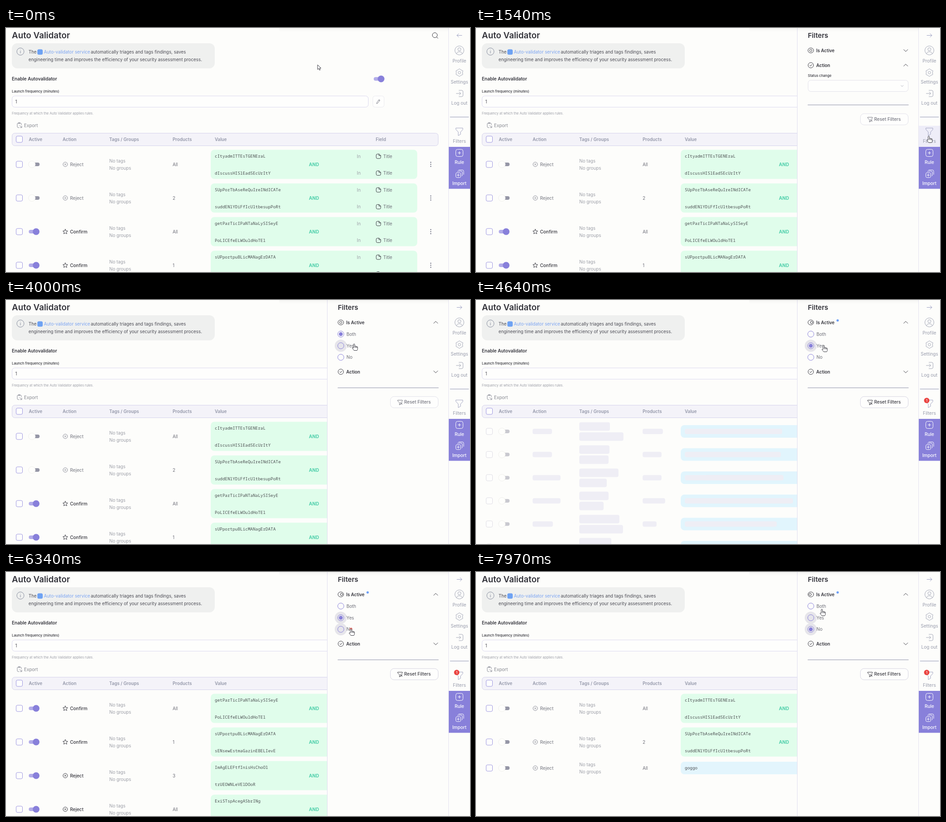
An HTML page for the animation above (8 s loop, 1029 by 544 pixels).

```html
<!DOCTYPE html>
<html lang="en">
<head>
<meta charset="utf-8">
<title>Auto Validator</title>
<style>
  html, body { margin: 0; width: 100%; height: 100%; overflow: hidden; background: #fdfdfb; }
  svg { display: block; width: 100%; height: 100%; }
  text { font: 400 9.8px Inter, "Open Sans", sans-serif; fill: #4c4c55; white-space: pre; }
  .semi { font-weight: 600; fill: #33333b; }
  .med { font-weight: 500; fill: #33333b; }
  .dim { fill: #85878f; }
  .soft { fill: #9c9ea7; }
  .option { fill: #6c6d77; }
  .link { fill: #7ba4f2; }
  .reset { font-weight: 500; fill: currentColor; }
  .head { font-weight: 600; fill: #9397a9; }
  .mono { font: 400 9.4px "Noto Sans Mono", "DejaVu Sans Mono", monospace; fill: #4c4f52; }
  .and { font-weight: 700; fill: #4fcfab; text-anchor: middle; }
  .side { fill: #979bab; text-anchor: middle; }
  .light { font-weight: 500; fill: #fff; text-anchor: middle; }
  .icon { fill: none; stroke-width: 1; stroke-linecap: round; stroke-linejoin: round; }
</style>
</head>
<body>
<svg id="stage" viewBox="0 0 1029 544" preserveAspectRatio="none"></svg>
<script>
const LOOP = 8000;
const PAGE = '#fdfdfb', PURPLE = '#8880da', DARK = '#3a3a42', GREY = '#a3a7b6';

// Markup helpers; text is placed by its vertical centre.
const text = (x, y, str, cls = '', size = 9.8) =>
  `<text x="${x}" y="${y + size * .36}" class="${cls}" style="font-size:${size}px">${str}</text>`;
const mono = (x, y, str) => text(x, y, str, 'mono', 9.4);
const rect = (x, y, w, h, r, fill, stroke = 'none') =>
  `<rect x="${x}" y="${y}" width="${w}" height="${h}" rx="${r}" fill="${fill}" stroke="${stroke}"/>`;
const circle = (x, y, r, fill, stroke = 'none') =>
  `<circle cx="${x}" cy="${y}" r="${r}" fill="${fill}" stroke="${stroke}"/>`;
const path = (d, stroke = DARK, x = 0, y = 0) =>
  `<path class="icon" d="${d}" stroke="${stroke}" transform="translate(${x} ${y})"/>`;
const group = (id, body) => `<g id="${id}">${body}</g>`;

const FUNNEL = 'M-7.5-8h15v3.5l-5 5.5v5l-5 3v-8l-5-5.5z';
const STAR = 'M0-5.5 1.6-1.8 5.5-1.5 2.5 1.1 3.5 5 0 2.9-3.5 5-2.5 1.1-5.5-1.5-1.6-1.8Z';
const CROSS = 'M-1.8-1.8 1.8 1.8M1.8-1.8-1.8 1.8';
const DOC = 'M-5-2.5q0-2.5 2.5-2.5h4l3.5 3.5v4q0 2.5-2.5 2.5h-5q-2.5 0-2.5-2.5zM1-5v3.5h4';
const PLUS = 'M-3 0h6M0-3v6';
const CHEVRON = 'M-4.5-2 0 2.5 4.5-2';

const checkbox = (y, color = '#9b95e0') => rect(22.5, y - 7, 14, 14, 3, '#fefefd', color);

function toggle(x, y, on, track = '#9596a6') {
  return on
    ? rect(x, y - 4, 18, 8, 4, '#b2ace9') + circle(x + 16.3, y, 7.5, PURPLE)
    : rect(x + 6, y - 4, 18, 8, 4, track) + circle(x + 7, y, 7.5, '#fefefc', '#f0f0ec');
}

const RULES = {
  city: [['cItyadmITTEsTGENEraL', 'dIscussHISlEadSEcUrItY'], 'All', 'Reject', false],
  base: [['SUpPorTbAseReQuIreINdICATe', 'suddENlYDiFfIcUltbesupPoRt'], '2', 'Reject', false],
  part: [['getParTicIPaNTaNaLySISeyE', 'PoLICEfeELWOuldHoTEl'], 'All', 'Confirm', true],
  data: [['sUPportpuBLicMANagErDATA', 'sENsewEstmaGazinEBELIevE'], '1', 'Confirm', true],
  left: [['ImAgELEFtfInisHsChoOl', 'trUEOWNLeVElDOoR'], '3', 'Reject', true],
  gas: [['ExiSTspAcegASbrINg', 'sOmETiMEcArRyHoLd'], 'All', 'Reject', true],
  short: [['goggo'], 'All', 'Reject', false],
};

function ruleRow([values, products, action, on], y) {
  const pair = values.length > 1;
  const color = on ? DARK : '#8b8d98';
  let out = checkbox(y) + toggle(50.5, y, on);
  out += action === 'Confirm'
    ? path(STAR, color, 131.5, y)
    : circle(131.5, y, 5, 'none', color) + path(CROSS, color, 131.5, y);
  out += text(142, y, action, on ? 'med' : 'med dim', 10);
  out += text(229, y - 8, 'No tags', 'soft') + text(229, y + 8, 'No groups', 'soft');
  out += text(369.5, y, products, 'option');
  out += pair ? rect(454, y - 32.5, 458, 65, 8, '#e0fdeb') : rect(454, y - 14, 458, 28, 8, '#e3f5fd');
  values.forEach((value, i) => {
    const vy = pair ? y - 18 + i * 37.5 : y;
    out += mono(463, vy, value) + text(778, vy, 'In', 'soft');
    out += path(DOC, DARK, 826, vy) + text(836.5, vy, 'Title', 'option');
  });
  if (pair) out += text(683, y, 'AND', 'and', 10);
  return out + [-4.5, 0, 4.5].map(d => circle(942, y + d, 1.2, '#77798a')).join('');
}

function ruleList(names) {
  let y = 304;
  return names.split(' ').map((name, i) => {
    if (i) y += name === 'short' ? 58 : 75;
    return ruleRow(RULES[name], y);
  }).join('');
}

// Each entry: widths of action, two tag bars, products, value.
const LOADING_YES = [[43, 68, 98, 45, 216], [43, 67, 65, 42, 213], [62, 87, 61, 42, 219],
  [62, 65, 54, 50, 240], [45, 89, 97, 31, 204], [50, 71, 60, 40, 210]];
const LOADING_NO = [[57, 65, 56, 37, 201], [40, 69, 84, 40, 199], [54, 68, 65, 47, 201],
  [47, 91, 90, 28, 171], [71, 81, 71, 43, 192], [50, 71, 60, 40, 200]];

function skeleton(rows) {
  return rows.map(([action, tagA, tagB, products, value], i) => {
    const y = 293 + i * 51.6;
    const bar = (x, by, w, h) => rect(x, by - h / 2, w, h, 4, '#efeef5');
    return checkbox(y, '#dddce4') + toggle(50.5, y, false, '#c9c9d0') +
      rect(454, y - 14, 458, 28, 8, '#e1f5fd') +
      `<g class="pulse">${bar(125.5, y, action, 12)}${bar(229, y - 11, tagA, 19)}${
        bar(229, y + 11.5, tagB, 19)}${bar(369.5, y, products, 12)}${bar(463, y, value, 12)}</g>`;
  }).join('');
}

function page() {
  const heads = { Active: 50.5, Action: 125.5, 'Tags / Groups': 229, Products: 369.5, Value: 463, Field: 820 };
  return text(13, 16, 'Auto Validator', 'semi', 18.8) +
    circle(951, 16, 5.5, 'none', DARK) + path('M955 20l3 3') +
    rect(13, 34, 450, 56, 12, '#eff0ef') +
    circle(32, 52.5, 8, 'none', '#858c9d') + path('M32 51.5v4.5M32 48.8v.2', '#858c9d') +
    text(50, 53.5, 'The') + rect(69.5, 47.5, 12, 12, 3.5, '#6ea2f3') +
    text(84, 53.5, 'Auto-validator service', 'link') +
    text(188, 53.5, 'automatically triages and tags findings, saves') +
    text(50, 70, 'engineering time and improves the efficiency of your security assessment process.') +
    text(13, 113.5, 'Enable Autovalidator', 'semi', 10) + toggle(815.5, 113.5, true) +
    text(13, 141, 'Launch frequency (minutes)', 'med', 7.8) +
    rect(13.5, 151.5, 790, 25, 6, '#fefefd', '#dbd9ef') + text(20.5, 164, '1') +
    rect(813.5, 151.5, 25, 25, 5, '#fefefd', '#ebeaf0') +
    path('M-3.5 4.5l.8-3 4.5-6 2 1.5-4.5 6zM.8-3.3l2 1.5', '#82848f', 825.5, 164) +
    text(13, 190, 'Frequency at which the Auto Validator applies rules.', 'soft', 7.4) +
    path('M-1 5h-2q-2 0-2-2v-6q0-2 2-2h5q2 0 2 2v2M-2-6h3v2h-3zM0 0l5 5M5 1.5v3.5h-3.5', '#8b8d98', 30, 217) +
    text(40, 217, 'Export', 'dim', 10) +
    rect(13.5, 234.5, 945, 28, 6, '#f4f3f9', '#d5d3ec') + checkbox(248) +
    Object.entries(heads).map(([name, x]) => text(x, 248, name, 'head')).join('');
}

const header = (y, name) => text(754.5, y, name, 'semi');
const RADIO_Y = [76, 102, 127.7];

function panel() {
  const radios = ['Both', 'Yes', 'No'].map((name, i) =>
    `<circle class="halo" cx="742.5" cy="${RADIO_Y[i]}" r="13.5" fill="#e6e5ea"/>` +
    circle(742.5, RADIO_Y[i], 6.8, 'none', PURPLE) +
    `<circle class="pick" cx="742.5" cy="${RADIO_Y[i]}" r="4.3" fill="${PURPLE}"/>` +
    text(755, RADIO_Y[i], name, 'option')).join('');
  const status = text(736, 23, 'Status change', 'med', 7.6) +
    rect(736.5, 33.5, 222, 25, 6, '#fefefd', '#e2e1ea') + path('M-2.5-1 0 1.5 2.5-1', '#b0b1bb', 945, 46);
  return rect(712, 0, 270, 544, 0, PAGE) + path('M712.5 0V544', '#e0deef') +
    text(736, 16.5, 'Filters', 'semi', 15) +
    `<ellipse cx="742.5" cy="50" rx="6.3" ry="5.6" fill="none" stroke="${DARK}"/>` +
    `<circle id="pupil" cy="50" r="2.6" fill="none" stroke="${DARK}"/>` + header(50, 'Is Active') +
    group('dot', circle(802, 45.5, 2.6, '#6f9ff5')) +
    group('chevA', path(CHEVRON)) +
    group('radios', radios) +
    group('action', circle(742.5, 0, 6, 'none', DARK) + path('M-2.5 0l2 2 3.2-3.8', DARK, 742.5, 0) +
      header(0, 'Action') + group('chevB', path(CHEVRON)) + group('status', status)) +
    group('foot', path('M736 0H959', '#8b8ea5') +
      '<rect id="resetBox" x="852.5" y="19.5" width="106" height="25" rx="8" fill="#fefefd"/>' +
      group('reset', path('M-5-4.5h10v2l-3.5 3.5v3.5l-3 1.5v-5l-3.5-3.5zM1 1l4 4M5 1l-4 4', 'currentColor', 874, 32) +
        text(883, 32, 'Reset Filters', 'reset', 10)));
}

function sidebar() {
  const label = (y, str, cls = 'side') => text(1005.5, y, str, cls, 10);
  const gear = [...Array(12)].map((_, i) => {
    const a = i * Math.PI / 6, r = i % 2 ? 8.6 : 7;
    return `${(Math.cos(a) * r).toFixed(1)} ${(Math.sin(a) * r).toFixed(1)}`;
  }).join('L');
  return rect(982, 0, 47, 544, 0, PAGE) + path('M981.5 0V544', '#e4e2f0') +
    group('arrow', path('M5.5 0h-11l3.8-3.8M-5.5 0l3.8 3.8', '#9b9ec2')) +
    circle(1005.5, 50, 10, 'none', GREY) + circle(1005.5, 47.5, 3.5, 'none', GREY) +
    path('M-6 7.5q0-4.5 6-4.5t6 4.5', GREY, 1005.5, 50) + label(73.5, 'Profile') +
    path(`M${gear}Z`, GREY, 1005.5, 99.5) + circle(1005.5, 99.5, 2.8, 'none', GREY) + label(120, 'Settings') +
    path('M-2-7h6q3 0 3 3v8q0 3-3 3h-6M-8 0H2M-1.5-3.5 2 0-1.5 3.5', GREY, 1006.5, 146) + label(167, 'Log out') +
    path('M985 198.5h41', '#8f94b4') +
    group('hover', rect(982, 218, 47, 47, 0, '#eeedf8')) +
    path(FUNNEL, '#a0a3c0', 1005.5, 231) + label(252.5, 'Filters') +
    group('badge', circle(999.5, 224, 6, '#ea4340') + text(999.5, 224, '1', 'light', 7.5)) +
    rect(982, 265, 47, 93.5, 0, PURPLE) +
    rect(997.5, 270.5, 16, 16, 4, 'none', '#fff') + path(PLUS, '#fff', 1005.5, 278.5) + label(299.5, 'Rule', 'light') +
    rect(997.5, 322.5, 11, 11, 3, 'none', '#fff') + path(PLUS, '#fff', 1003, 328) +
    path('M1001 320q0-1 2-1h6q3 0 3 3v6q0 2-1 2M1004 316.5h8q3 0 3 3v7', '#fff') + label(346.5, 'Import', 'light');
}

const outline = d => `<path d="${d}" fill="#fff" stroke="#3a3a42" stroke-linejoin="round"/>`;
const pointer = group('pointer',
  group('arrowTip', outline('M0 0V10.5L2.5 8.2 4.2 12 6 11.2 4.4 7.5H7.5Z')) +
  group('hand', outline('M-1.4 9V1.2Q-1.4 0 0 0T1.4 1.2V5Q3 4.2 3.8 5.4 5.2 4.8 6 6 7.8 5.6 7.8 7.4V10.5Q7.8 12.5 6.5 14.5H-.2Q-1.5 12.5-4 9.6-4.3 7.6-1.4 9Z') +
    path('M1.4 5.2v3M3.8 6v2.3M6 6.5v2')));

document.getElementById('stage').innerHTML =
  '<defs><linearGradient id="shade" x2="0" y2="1"><stop stop-color="#000" stop-opacity=".035"/>' +
  '<stop offset="1" stop-color="#000" stop-opacity="0"/></linearGradient></defs>' +
  rect(0, 0, 1029, 544, 0, PAGE) + page() +
  group('all', ruleList('city base part data')) + group('yes', ruleList('part data left gas')) +
  group('no', ruleList('city base short')) +
  group('waitYes', skeleton(LOADING_YES)) + group('waitNo', skeleton(LOADING_NO)) +
  group('panel', panel()) + rect(606, 0, 375, 9, 0, 'url(#shade)') + sidebar() +
  '<circle id="ripple" fill="#ee5a50"/>' + pointer;

// Cursor stops: time, x, y.
const MOVES = [[0, 691, 82], [70, 691, 82], [760, 1004, 241], [1620, 1004, 241], [2330, 776, 51],
  [2850, 776, 51], [3550, 772, 98], [4520, 772, 98], [5050, 765, 127], [6990, 765, 127],
  [7200, 767, 127], [7650, 767, 127], [7960, 767, 83], [LOOP, 767, 83]];
const CLICKS = [850, 2450, 4320, 6320];
const PICK_YES = 4380, PICK_NO = 6420;
const LOADS = { yes: [4430, 5900], no: [6470, 7480] };

const $ = id => document.getElementById(id);
const halos = document.querySelectorAll('.halo');
const picks = document.querySelectorAll('.pick');
const pulses = document.querySelectorAll('.pulse');
const clamp = v => Math.max(0, Math.min(1, v));
const ease = p => p < .5 ? 2 * p * p : 1 - 2 * (1 - p) ** 2;
const ramp = (t, from, length) => ease(clamp((t - from) / length));
const show = (id, on) => { $(id).style.display = on ? '' : 'none'; };
const move = (id, x, y, extra = '') => $(id).setAttribute('transform', `translate(${x} ${y}) ${extra}`);

function cursorAt(t) {
  const i = Math.max(1, MOVES.findIndex(m => m[0] >= t));
  const [t0, x0, y0] = MOVES[i - 1], [t1, x1, y1] = MOVES[i];
  const p = ramp(t, t0, t1 - t0);
  return [x0 + (x1 - x0) * p, y0 + (y1 - y0) * p];
}

function hoveredRadio(t) {
  const [x, y] = cursorAt(t);
  return t > 2700 && x > 728 && x < 785 ? RADIO_Y.findIndex(r => Math.abs(r - y) < 12.9) : -1;
}

function drawTable(t) {
  const loading = name => t >= LOADS[name][0] && t < LOADS[name][1];
  show('all', t < LOADS.yes[0]);
  show('waitYes', loading('yes'));
  show('yes', t >= LOADS.yes[1] && t < LOADS.no[0]);
  show('waitNo', loading('no'));
  show('no', t >= LOADS.no[1]);
  const start = t < LOADS.no[0] ? LOADS.yes[0] : LOADS.no[0];
  const glow = .85 + .15 * Math.cos((t - start) / 1000 * Math.PI);
  pulses.forEach(p => { p.style.opacity = glow; });
}

function drawPanel(t) {
  const slide = ramp(t, 870, 260), open = ramp(t, 2480, 280);
  const picked = t < PICK_YES ? 0 : t < PICK_NO ? 1 : 2;
  const filtered = picked > 0;
  show('panel', slide > 0);
  move('panel', 275 * (1 - slide), 0);
  move('arrow', 1005.5, 16.5, t > 870 ? 'scale(-1 1)' : '');
  move('chevA', 953, 50, `rotate(${180 * open})`);
  move('action', 0, 83 + 77 * open);
  move('chevB', 953, 0, `rotate(${180 * (1 - open)})`);
  move('foot', 0, 171.5 + 24.3 * open);
  $('radios').style.opacity = clamp(open * 2 - 1);
  $('status').style.opacity = clamp(1 - open * 2);
  $('pupil').setAttribute('cx', 742.5 + [0, 1.5, -1.5][picked]);
  show('dot', filtered);
  show('badge', filtered);
  $('reset').style.color = filtered ? DARK : '#74757f';
  $('resetBox').setAttribute('stroke', filtered ? '#d6d4e2' : '#e2e1ea');

  const hovered = hoveredRadio(t - 110);
  halos.forEach((h, i) => h.setAttribute('opacity', i === hovered || filtered && i === picked ? 1 : 0));
  picks.forEach((p, i) => { p.style.display = i === picked ? '' : 'none'; });
}

function drawPointer(t) {
  const [x, y] = cursorAt(t);
  const onHeader = t > 1620 && y > 40 && y < 62 && x > 728 && x < 965;
  const hand = x > 982 || onHeader || hoveredRadio(t) >= 0;
  show('hover', x > 982 && y > 218);
  show('hand', hand);
  show('arrowTip', !hand);
  move('pointer', x, y);

  const click = CLICKS.find(c => t >= c && t < c + 280);
  show('ripple', click !== undefined);
  if (click === undefined) return;
  const p = (t - click) / 280;
  const [cx, cy] = cursorAt(click);
  const ring = { cx, cy, r: 2.5 + 8 * p, opacity: .75 * (1 - p) };
  Object.entries(ring).forEach(([name, value]) => $('ripple').setAttribute(name, value));
}

const began = performance.now();
function tick() {
  const t = (performance.now() - began) % LOOP;
  drawTable(t);
  drawPanel(t);
  drawPointer(t);
  requestAnimationFrame(tick);
}
tick();
</script>
</body>
</html>
```
